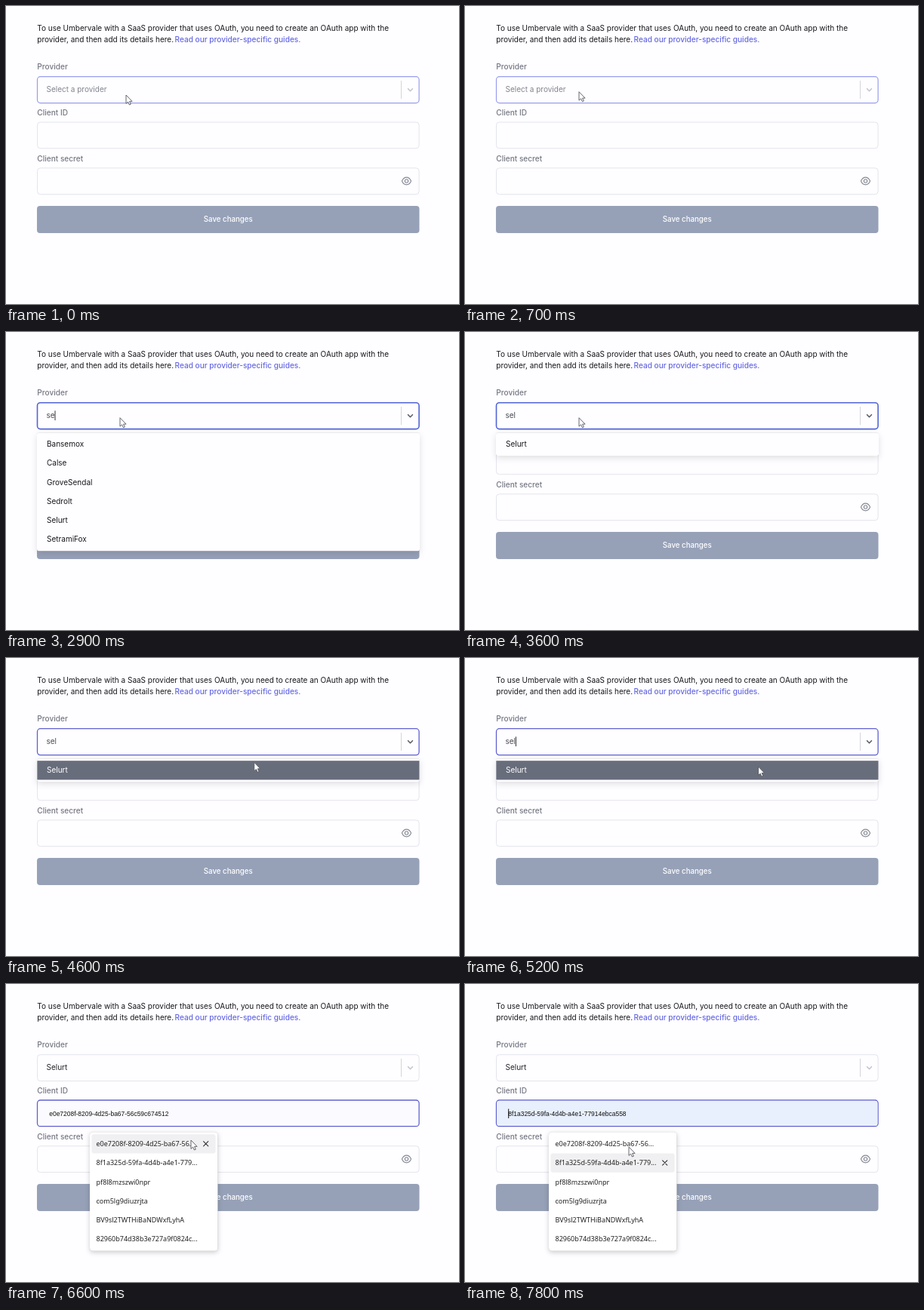
Recreate the animation shown at these times as an HTML page. Size 600x395 px, loop 8 s.

```html
<!DOCTYPE html>
<html lang="en">
<head>
<meta charset="utf-8">
<title>Provider form</title>
<style>
  html, body { margin: 0; width: 100%; height: 100%; overflow: hidden; background: #fefdff; }
  svg { display: block; width: 100vw; height: 100vh; }
  text { font: 400 10px Inter, "Open Sans", sans-serif; fill: #17181c; white-space: pre; }
  .label { font-weight: 500; font-size: 10.1px; fill: #747782; }
  .link { font-weight: 500; font-size: 10.1px; fill: #6468e2; }
  .button { font-weight: 500; font-size: 9.7px; fill: #fff; text-anchor: middle; }
  .filled { font: 8.45px "Liberation Sans", Arial, sans-serif; fill: #111; }
  .saved { font: 500 9px "Noto Sans", "Open Sans", sans-serif; fill: #222; }
  .menu { filter: drop-shadow(0 0 .6px rgba(0,0,0,.25)) drop-shadow(0 3px 4px rgba(0,0,0,.12)); }
  .popup { filter: drop-shadow(0 0 .7px rgba(0,0,0,.3)) drop-shadow(0 2px 3px rgba(0,0,0,.2)); }
  .line { fill: none; stroke-linecap: round; stroke-linejoin: round; }
</style>
</head>
<body>
<svg viewBox="0 0 600 395" xmlns="http://www.w3.org/2000/svg">
  <defs><clipPath id="menuClip"><rect id="menuClipRect" x="41" y="133.5" width="507" height="190"/></clipPath></defs>

  <text x="41.3" y="33.2">To use Umbervale with a SaaS provider that uses OAuth, you need to create an OAuth app with the</text>
  <text x="41.3" y="48.1">provider, and then add its details here.</text>
  <text class="link" x="223.5" y="48.1">Read our provider-specific guides.</text>

  <text class="label" x="41.3" y="84">Provider</text>
  <rect id="select" x="41.5" y="93.7" width="505.6" height="34.9" rx="4" fill="#fefdff"/>
  <text id="value" x="53.5" y="114.4"></text>
  <rect id="caret" y="104.3" width="1" height="12.8" fill="#333"/>
  <path d="M523.5 99V123" stroke="#d3d6de"/>
  <path id="chevron" class="line" d="M532.6 109.7L535.5 112.7L538.4 109.7" stroke-width="1.6"/>

  <text class="label" x="41.3" y="144.5">Client ID</text>
  <rect id="client" x="41.5" y="154" width="505.6" height="34.7" rx="4" fill="#fefdff"/>
  <rect id="tint" x="42.2" y="154.7" width="504.2" height="33.3" rx="3.4" fill="#e8f0fe"/>
  <text id="clientText" class="filled" x="57.3" y="175"></text>
  <rect id="clientCaret" x="57.2" y="165.5" width="1" height="12.5" fill="#111"/>

  <text class="label" x="41.3" y="205.6">Client secret</text>
  <rect x="41.5" y="214.8" width="505.6" height="34.8" rx="4" fill="#fefdff" stroke="#e4e5ed"/>
  <g class="line" stroke="#858994" stroke-width="1.1">
    <path d="M524.4 232C527.3 225.5 533.7 225.5 536.6 232C533.7 238.5 527.3 238.5 524.4 232Z"/>
    <circle cx="530.5" cy="232" r="2.2"/>
  </g>

  <rect x="41" y="265" width="506.5" height="36" rx="4" fill="#96a1b8"/>
  <text class="button" x="294.3" y="286.4">Save changes</text>

  <g id="menu">
    <rect id="menuBox" class="menu" x="41" y="133.5" width="507" rx="2.5" fill="#fefdff"/>
    <rect id="optionHover" x="41.3" y="136.2" width="506.2" height="25.2" fill="#686d7c"/>
    <g id="options" clip-path="url(#menuClip)"></g>
    <g id="scrollbar">
      <rect x="536" y="134" width="11" height="189" fill="#f1f0f2"/>
      <rect id="thumb" x="537" y="146" width="9" fill="#c0c0c3"/>
      <path d="M538.8 141.3L541.5 138.4L544.2 141.3Z" fill="#a0a0a3"/>
      <path d="M538.8 315.7L541.5 318.6L544.2 315.7Z" fill="#505053"/>
    </g>
  </g>

  <g id="popup">
    <rect class="popup" x="111" y="196.3" width="169.5" height="157.4" rx="4" fill="#fff"/>
    <g id="row">
      <rect x="113.5" y="199.2" width="164" height="25.2" rx="3" fill="#f0eff1"/>
      <path class="line" d="M261.6 208.7L267.8 214.9M267.8 208.7L261.6 214.9" stroke="#333" stroke-width="1.1"/>
    </g>
    <g id="saved"></g>
  </g>

  <path id="arrow" d="M0 0V11.4L2.6 9.1L4.4 13L6.3 12.2L4.6 8.4H8.1Z" fill="#fff" stroke="#55575f" stroke-width=".9" stroke-linejoin="round"/>
  <path id="beam" class="line" d="M-2 -6H2M0 -6V6M-2 6H2" stroke="#333" stroke-width="1"/>
</svg>
<script>
const $ = id => document.getElementById(id);
const LOOP = 8000, STEP = 100, ROW = 25.25;

const providers = ["AMobur", "Adelin Rosterings", "Azu", "Alferin", "Andrilty", "Aroso", "Avrensilo", "Avtir",
  "Bansemox", "Calse", "GroveSendal", "Sedrolt", "Selurt", "SetramiFox"];
const ids = ["e0e7208f-8209-4d25-ba67-56c59c674512", "8f1a325d-59fa-4d4b-a4e1-77914ebca558"];
const saved = [ids[0].slice(0, 26) + "...", ids[1].slice(0, 27) + "...",
  "pf8l8mzszwi0npr", "com5lg9diuzrjta", "BV9sl2TWTHiBaNDWxfLyhA", "82960b74d38b3e727a9f0824c..."];

// time, x, y of the pointer
const path = [[0, 159, 118], [400, 159, 118], [700, 151, 113.7], [4000, 151, 113.7], [4900, 391, 147],
  [5000, 388.5, 144], [5500, 388.5, 144], [5800, 330, 170], [6300, 330, 170], [6600, 245, 207],
  [6900, 238, 227], [7200, 232, 239], [7600, 229, 236], [7800, 217, 216], [8000, 217, 216]];

const show = (id, on) => $(id).setAttribute("visibility", on ? "inherit" : "hidden");
const set = (id, attrs) => { for (const k in attrs) $(id).setAttribute(k, attrs[k]); };
const clamp = v => Math.max(0, Math.min(1, v));
const rows = (list, x, y, cls, fill) => list.map((s, i) =>
  `<text class="${cls}" x="${x}" y="${y + i * ROW}"${fill ? ` style="fill:${fill}"` : ""}>${s}</text>`).join("");

function pointer(t) {
  const i = path.findIndex((p, k) => k && t < p[0]);
  const [t0, x0, y0] = path[i - 1], [t1, x1, y1] = path[i];
  const u = (t - t0) / (t1 - t0), e = u * u * (3 - 2 * u);
  return [x0 + (x1 - x0) * e, y0 + (y1 - y0) * e];
}

function border(id, focus, hover) {
  const [stroke, width] = focus ? (hover ? ["#5065d6", 1.6] : ["#5f60d2", 1.3])
    : hover ? ["#989ded", 1.2] : ["#e4e5ed", 1];
  set(id, { stroke, "stroke-width": width });
}

// on for half a second, off for half a second, counted from the last key press
const blink = (t, since) => (t - since) % 1000 < 500;

function drawMenu(open, query, hover) {
  show("menu", open);
  if (!open) return;
  const found = providers.filter(n => n.toLowerCase().includes(query));
  const long = found.length > 7;
  const height = long ? 189.5 : found.length * ROW + 5.2;
  set("menuBox", { height });
  set("menuClipRect", { height });
  $("options").innerHTML = rows(found.slice(0, 8), 54, 152, "", hover ? "#fff" : "");
  show("optionHover", hover);
  show("scrollbar", long);
  set("thumb", { height: query ? 32 : 15 });
}

function draw(t) {
  const [x, y] = pointer(t);
  const open = t >= 1000 && t < 5300;
  const picked = t >= 5300;
  const inClient = t >= 5800;
  const query = t < 2500 ? "" : t < 2800 ? "s" : t < 3100 ? "se" : "sel";

  border("select", t >= 1000 && !inClient, y > 94 && y < 129);
  const value = $("value");
  value.textContent = picked ? "Selurt" : query || "Select a provider";
  value.style.fill = picked ? "#26272c" : query ? "#484a52" : "#82858f";
  set("caret", { x: query ? 53.4 + value.getComputedTextLength() : 53.4 });
  show("caret", open && (t < 2500 ? t < 1400 || t >= 2000 : t < 3100 || blink(t, 3100)));
  set("chevron", { stroke: t >= 1000 && !inClient ? "#5c606a" : "#c4c7d0" });
  drawMenu(open, query, open && y > 136);

  const overField = y > 154 && y < 189;
  border("client", inClient, overField);
  const row = t < 6500 ? -1 : t < 6800 ? 0 : 1;
  set("tint", { opacity: clamp((t - 6500) / 700) });
  $("clientText").textContent = row < 0 ? "" : ids[row];
  show("clientCaret", inClient && (t < 6200 || t >= 6800 && t < 7300 || t >= 7800));

  show("popup", t >= 5900);
  show("row", row >= 0);
  set("row", { transform: `translate(0 ${Math.max(row, 0) * ROW})` });

  show("arrow", !overField);
  show("beam", overField);
  for (const id of ["arrow", "beam"]) set(id, { transform: `translate(${x} ${y})` });
}

$("saved").innerHTML = rows(saved, 119.5, 215.2, "saved");

function frame() {
  const t = performance.now() % LOOP;
  draw(Math.floor(t / STEP) * STEP);
  requestAnimationFrame(frame);
}
frame();
</script>
</body>
</html>
```
